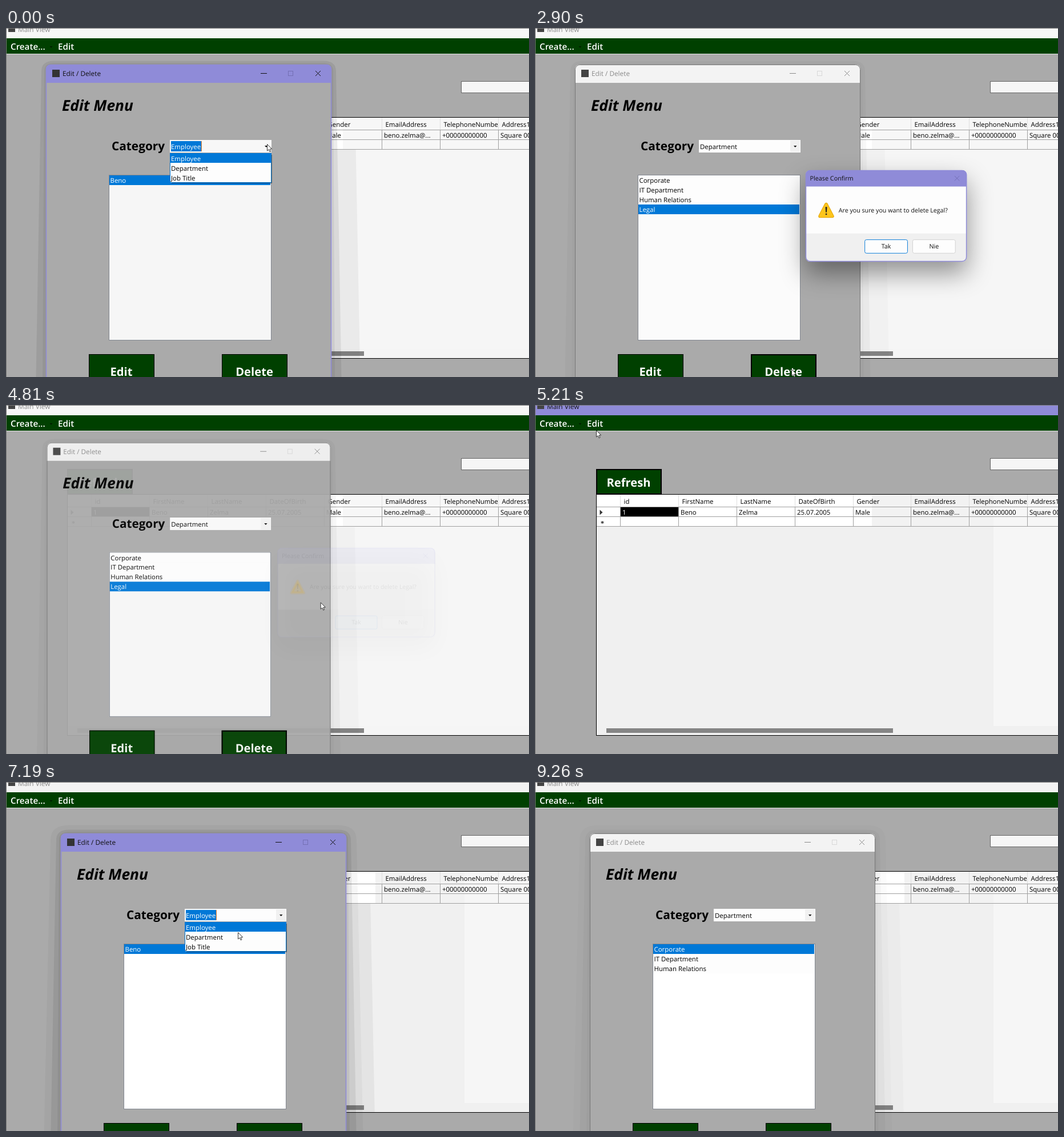
An HTML page with a canvas for the animation above (9.28 s loop, 916x611 px).

```html
<!DOCTYPE html>
<html lang="en">
<head>
<meta charset="utf-8">
<title>Edit menu demo</title>
<style>
html, body { margin: 0; width: 100%; height: 100%; overflow: hidden; background: #aaa; }
canvas { display: block; }
</style>
</head>
<body>
<canvas id="stage" width="916" height="611"></canvas>
<script>
const ctx = document.getElementById('stage').getContext('2d');
const LOOP = 9280;
const GREEN = '#004000', GRAY = '#aaaaaa', PURPLE = '#8f8bd8', BLUE = '#0078d7';
const DEPARTMENTS = ['Corporate', 'IT Department', 'Human Relations', 'Legal'];
const CATEGORIES = ['Employee', 'Department', 'Job Title'];
const COLUMNS = [
  [149, 'id', '1'], [251, 'FirstName', 'Beno'], [353, 'LastName', 'Zelma'],
  [455, 'DateOfBirth', '25.07.2005'], [557, 'Gender', 'Male'],
  [658, 'EmailAddress', 'beno.zelma@...'], [760, 'TelephoneNumber', '+00000000000'],
  [862, 'Address1', 'Square 00']
];
// Pointer stops: time, x, y
const POINTER = [
  [490, 457, 203], [1000, 365, 243], [1170, 365, 243], [1690, 220, 312],
  [1990, 220, 312], [2440, 449, 597], [2960, 449, 597], [3620, 598, 404],
  [3680, 598, 404], [3920, 612, 387], [4700, 612, 387], [5210, 107, 44],
  [5330, 103, 34], [5740, 103, 34], [6530, 480, 229], [6760, 480, 229],
  [7190, 406, 263], [7400, 395, 268], [7570, 395, 268], [8270, 572, 594]
];

const clamp = v => Math.max(0, Math.min(1, v));
const progress = (t, start, length) => clamp((t - start) / length);
const easeOut = p => 1 - (1 - p) ** 2;
const easeInOut = p => p * p * (3 - 2 * p);
const during = (t, from, to) => t >= from && t < to;

function box(x, y, w, h, fill, stroke, line = 1) {
  if (fill) { ctx.fillStyle = fill; ctx.fillRect(x, y, w, h); }
  if (stroke) {
    ctx.strokeStyle = stroke;
    ctx.lineWidth = line;
    ctx.strokeRect(x + line / 2, y + line / 2, w - line, h - line);
  }
}

function rounded(x, y, w, h, radius, fill, stroke, line = 1) {
  ctx.beginPath();
  ctx.roundRect(x, y, w, h, radius);
  if (fill) { ctx.fillStyle = fill; ctx.fill(); }
  if (stroke) { ctx.strokeStyle = stroke; ctx.lineWidth = line; ctx.stroke(); }
}

function shape(points, fill, stroke, line = 1) {
  ctx.beginPath();
  points.forEach(([x, y]) => ctx.lineTo(x, y));
  ctx.closePath();
  if (fill) { ctx.fillStyle = fill; ctx.fill(); }
  if (stroke) { ctx.strokeStyle = stroke; ctx.lineWidth = line; ctx.stroke(); }
}

function lines(color, ...segments) {
  ctx.strokeStyle = color;
  ctx.lineWidth = 1;
  ctx.beginPath();
  for (const [x1, y1, x2, y2] of segments) { ctx.moveTo(x1, y1); ctx.lineTo(x2, y2); }
  ctx.stroke();
}

function text(value, x, y, color = '#000', size = 11.45, style = '', align = 'left') {
  ctx.font = `${style} ${size}px "Open Sans", "Noto Sans", sans-serif`;
  ctx.textRendering = 'geometricPrecision';
  ctx.textAlign = align;
  ctx.fillStyle = color;
  ctx.fillText(value, x, y);
}

function cross(x, y, size, color) {
  lines(color, [x, y, x + size, y + size], [x + size, y, x, y + size]);
}

function clipped(x, y, w, h, draw) {
  ctx.save();
  ctx.beginPath();
  ctx.rect(x, y, w, h);
  ctx.clip();
  draw();
  ctx.restore();
}

function scaled(cx, cy, scale, alpha, draw) {
  ctx.save();
  ctx.globalAlpha = alpha;
  ctx.translate(cx, cy);
  ctx.scale(scale, scale);
  ctx.translate(-cx, -cy);
  draw();
  ctx.restore();
}

function bigButton(label, x, y, focused) {
  box(x, y, 115, 45, GREEN, '#000', focused ? 2 : 1);
  text(label, x + 57, y + 38 - (label === 'Refresh' ? 7 : 0), '#fff', 20.2, 'bold', 'center');
}

function drawGrid(t) {
  const later = t >= 4850;
  box(107, 156, 820, 423, later ? '#f0f0f0' : '#f6f6f6', '#000');
  if (later) box(803, 157, 113, 421, '#f6f6f6');
  box(108, 157, 808, 56, '#fff');
  const edge = t < 5750 ? 590 : 647;
  box(edge, 157, 326, 56, later ? '#f2f2f2' : '#f7f7f7');
  if (later) box(803, 157, 113, 56, '#f6f6f6');
  lines('#a0a0a0', [108, 178.5, 916, 178.5], [108, 195.5, 916, 195.5], [108, 212.5, 916, 212.5]);
  box(150, 179, 101, 16, '#000');
  COLUMNS.forEach(([x, header, value], i) => {
    lines('#dedede', [x + .5, 157, x + .5, 178]);
    lines('#a0a0a0', [x + .5, 179, x + .5, 213]);
    clipped(x, 157, 101, 40, () => {
      text(header, x + 6.5, 173);
      text(value, x + 4, 192, i ? '#000' : '#fff');
    });
  });
  shape([[113.5, 183.5], [118.5, 188], [113.5, 192.5]], '#333');
  lines('#333', [115.5, 205.5, 120.5, 205.5], [118, 203, 118, 208],
    [116, 203.5, 120, 207.5], [120, 203.5, 116, 207.5]);
  box(108, 562, 808, 16, later ? '#f0f0f0' : '#f5f5f5');
  box(125, 566, 502, 8, '#858585');
}

function drawMain(t) {
  const active = during(t, 4830, 5700);
  box(0, 0, 916, 611, GRAY);
  box(0, 0, 916, 18, active ? PURPLE : t < 5700 ? '#f7f7f7' : '#f3f3f3');
  box(4, 0, 12, 7, '#444');
  text('Main View', 21, 7, active ? '#111' : '#8a8a8a', 11.9);
  box(0, 18, 916, 27, GREEN);
  box(0, 45, 916, 1, '#e4e4e4');
  text('Create...', 8, 38, '#fff', 15.2, '600');
  text('Edit', 91, 38, '#fff', 15.2, '600');
  shape([[76.5, 32], [81.5, 32], [79, 34.5]], '#001800');
  box(797, 93, 130, 21, '#f6f6f6', '#666');
  drawGrid(t);
  bigButton('Refresh', 107, 112, true);
  box(0, 0, 916, 1, '#777');
  box(0, 0, 1, 611, '#777');
}

function shadeBand(x, y, top, bottom, alpha) {
  ctx.beginPath();
  ctx.moveTo(x - bottom, 640);
  ctx.lineTo(x - top, y + 12);
  ctx.quadraticCurveTo(x - top, y - top * .8, x + 14, y - top * .8);
  ctx.lineTo(x + 486, y - top * .8);
  ctx.quadraticCurveTo(x + 500 + top, y - top * .8, x + 500 + top, y + 12);
  ctx.lineTo(x + 500 + bottom, 640);
  ctx.fillStyle = `rgba(0,0,0,${alpha})`;
  ctx.fill();
}

function windowShadow(x, y, active, wide) {
  const strength = active ? 1 : .4;
  clipped(571, 213, 345, 365, () => shadeBand(x, y, 40, 51, .05 * strength));
  if (wide) shadeBand(x, y, 18, 30, .035 * strength);
  shadeBand(x, y, 8, 18, .075 * strength);
  shadeBand(x, y, 3, 6, .06 * strength);
}

function drawCombo(t, x, y, state) {
  const { value, open, selected, caret, hot } = state;
  box(x, y, 178, 22, t < 1200 ? '#f7f7f7' : '#fdfdfd');
  if (!hot) box(x + 160, y + 1, 17, 20, '#f1f1f1');
  shape([[x + 166, y + 10], [x + 171.5, y + 10], [x + 168.7, y + 13]], '#111');
  const width = value === 'Employee' ? 53 : 65;
  if (selected) box(x + 2, y + 2, width, 18, BLUE);
  text(value, x + 2, y + 16, selected ? '#fff' : '#000');
  if (caret) box(x + 2 + width, y + 2, 1, 18, '#ff8728');
  if (!open) return;
  box(x + 3, y + 26, 176, 50, 'rgba(0,0,0,.45)');
  box(x, y + 23, 178, 52, '#fdfdfd', BLUE);
  CATEGORIES.forEach((name, i) => {
    const hover = i === state.hover;
    if (hover) box(x + 1, y + 23 + i * 17, 176, 17, BLUE);
    text(name, x + 2, y + 37 + i * 17, hover ? '#fff' : '#000');
  });
}

function drawEditWindow(t, pointer) {
  const first = t < 5000;
  const x = first ? 70 : 96, y = first ? 64 : 90;
  const active = first ? t < 2830 : t < 9100;
  const ink = active ? '#111' : '#8a8a8a';
  const value = (first ? t < 1200 : t < 7570) ? 'Employee' : 'Department';
  const open = t < 1200 || during(t, 6620, 7570);

  windowShadow(x, y, active, !first);
  rounded(x, y, 500, 660, 8, GRAY);
  rounded(x, y, 500, 32, [8, 8, 0, 0], active ? PURPLE : '#f3f3f3');
  rounded(x + .5, y + .5, 499, 660, 8, null, active ? PURPLE : '#777', active ? 1.6 : 1);
  box(x + 11, y + 9, 13, 13, active ? '#333' : '#444');
  text('Edit / Delete', x + 29, y + 20, ink, 11.8);
  lines(ink, [x + 376, y + 15.5, x + 387, y + 15.5]);
  box(x + 424, y + 11, 9, 9, null, active ? '#736fb4' : '#d8d8d8');
  cross(x + 472, y + 11, 9, ink);

  text('Edit Menu', x + 28, y + 81, '#000', 26.3, 'italic bold');
  text('Category', x + 115, y + 150, '#000', 20.8, 'bold');

  const plain = first && t < 2720;
  box(x + 110, y + 193, 285, 290, plain ? '#f6f6f6' : first ? '#fbfbfb' : '#fff', '#828790');
  const items = value === 'Employee' ? ['Beno'] : first ? DEPARTMENTS : DEPARTMENTS.slice(0, 3);
  const chosen = during(t, 1990, 5000) ? 3 : 0;
  items.forEach((name, i) => {
    const picked = i === chosen;
    const rowY = y + 194 + i * 17;
    box(x + 111, rowY, 282, 17, picked ? BLUE : '#fdfdfd');
    text(name, x + 112.5, rowY + 13, picked ? '#fff' : '#000');
  });

  bigButton('Edit', x + 75, y + 507, during(t, 5700, 6620));
  bigButton('Delete', x + 308, y + 507, during(t, 2450, 5000));
  drawCombo(t, x + 217, y + 132, {
    value, open,
    selected: first ? t < 1990 : during(t, 6620, 9100),
    caret: open || during(t, 8050, 8580),
    hot: pointer.x > x + 376 && pointer.y > y + 132 && pointer.y < y + 154,
    hover: pointer.y > y + 174 && pointer.x < x + 380 ? 1 : 0
  });
}

function dialogButton(label, x, fill, stroke) {
  rounded(x + .5, 374.5, 79, 25, 3, fill, stroke);
  text(label, x + 40, 391, '#111', 11.4, '', 'center');
}

function drawDialog(t) {
  ctx.save();
  ctx.shadowColor = 'rgba(0,0,0,.42)';
  ctx.shadowBlur = 44;
  ctx.shadowOffsetY = 20;
  rounded(470, 246, 298, 169, 8, '#f0f0f0');
  ctx.restore();
  box(471, 276, 296, 87, '#fdfdfd');
  rounded(470, 246, 298, 30, [8, 8, 0, 0], PURPLE);
  rounded(470.5, 246.5, 297, 168, 8, null, PURPLE, 1.6);
  text('Please Confirm', 478, 265, '#111', 11.4);
  cross(745.5, 256.5, 9, '#7470b6');

  ctx.lineJoin = 'round';
  const triangle = [[508, 309], [519.5, 331], [496.5, 331]];
  shape(triangle, '#e0a000', '#e0a000', 6);
  shape(triangle, '#fdc51c', '#fdc51c', 4);
  ctx.lineJoin = 'miter';
  shape([[506.5, 314], [509.7, 314], [509, 324], [507.2, 324]], '#222');
  box(506.8, 326, 2.6, 2.6, '#222');
  text('Are you sure you want to delete Legal?', 531, 324, '#111', 11.28);

  const fill = t < 3580 ? '#fdfdfd' : t < 4600 ? '#e0eef9' : '#d6e8f6';
  dialogButton('Tak', 579, fill, BLUE);
  dialogButton('Nie', 667.5, '#fdfdfd', '#d0d0d0');
}

function pointerAt(t) {
  const next = POINTER.findIndex(([time]) => time > t);
  if (next === 0) return { x: POINTER[0][1], y: POINTER[0][2] };
  if (next < 0) return { x: 1000, y: 700 };
  const [t0, x0, y0] = POINTER[next - 1];
  const [t1, x1, y1] = POINTER[next];
  const p = easeInOut((t - t0) / (t1 - t0));
  return { x: x0 + (x1 - x0) * p, y: y0 + (y1 - y0) * p };
}

function drawPointer({ x, y }) {
  const outline = [[0, 0], [0, 11.5], [2.7, 9.2], [4.6, 13.3], [6.4, 12.5], [4.6, 8.5], [8.2, 8.3]];
  shape(outline.map(([dx, dy]) => [x + .5 + dx, y + .5 + dy]), '#fff', '#222', .9);
}

function render(t) {
  const pointer = pointerAt(t);
  drawMain(t);

  const closing = progress(t, 4800, 180);
  const opening = progress(t, 5700, 220);
  if (closing < 1 || opening > 0) {
    const first = closing < 1;
    const scale = first ? 1 - .1 * closing : .9 + .1 * easeOut(opening);
    const alpha = first ? 1 - closing : clamp(opening * 2);
    scaled(first ? 320 : 346, first ? 364 : 390, scale, alpha, () => drawEditWindow(t, pointer));
  }

  const appear = progress(t, 2840, 226);
  const vanish = progress(t, 4690, 130);
  if (appear > 0 && vanish < 1) {
    const scale = .9 + .1 * easeOut(appear) - .08 * vanish;
    scaled(545, 302, scale, clamp(appear * 4) * (1 - vanish), () => drawDialog(t));
  }
  drawPointer(pointer);
}

const start = performance.now();
function tick() {
  render((performance.now() - start) % LOOP);
  requestAnimationFrame(tick);
}
tick();
</script>
</body>
</html>
```
